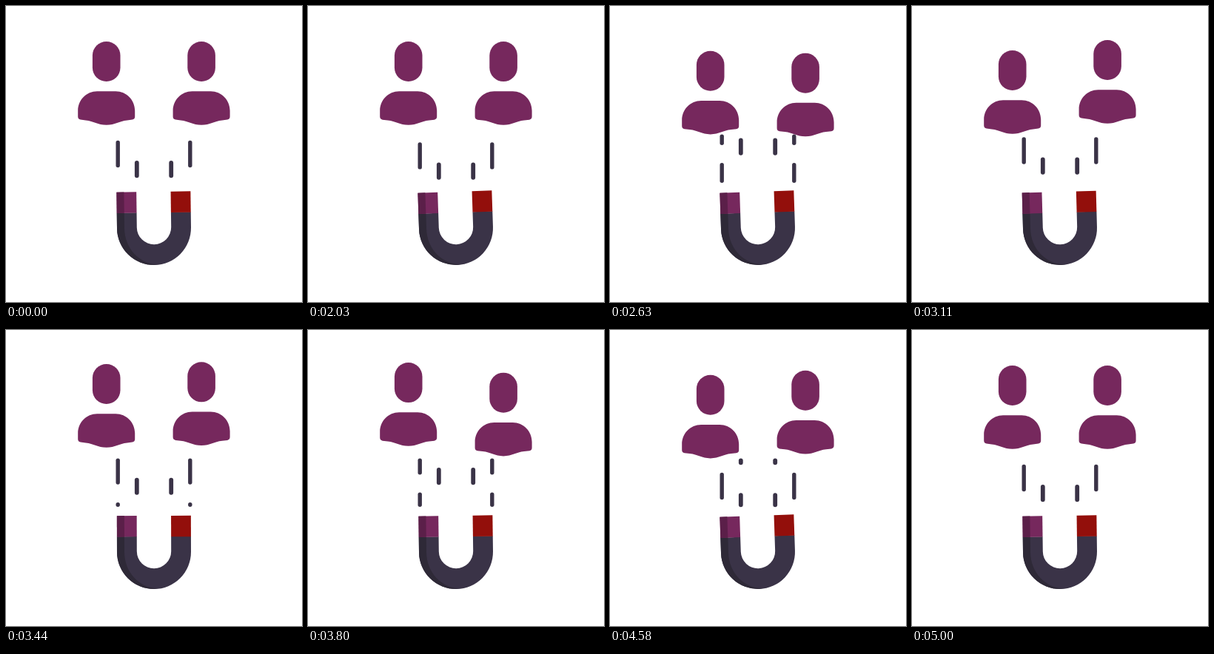
Animation, 400 px wide and 400 px high, one loop 5120 ms. Source, as an HTML page with a canvas:

```html
<!DOCTYPE html>
<html lang="en">
<head>
<meta charset="utf-8">
<title>Magnet</title>
<style>
  html, body { margin: 0; width: 100%; height: 100%; overflow: hidden; background: #fff; }
  canvas { display: block; width: 100vw; height: 100vh; object-fit: contain; }
</style>
</head>
<body>
<canvas width="400" height="400"></canvas>
<script>
const ctx = document.querySelector('canvas').getContext('2d');

const LOOP = 5120, HOLD = 2030, STEP = 30, STEPS = 100;
const PLUM = '#76285d', PLUM_DARK = '#5b1f49';
const SLATE = '#3a3347', SLATE_DARK = '#2e2937', RED = '#930f0b';

// Keys are [step, value] pairs.
const leftBob = [[0, 0], [30, 16], [55, -6], [80, 16], [100, 0]];
const rightBob = [[0, 0], [19, 16], [44, -6], [69, 16], [100, 0]];
const flow = [[0, 0], [1, 0.04], [21, 1.5], [37, 2.925], [48, 3.845], [72, 5.35], [100, 7]];

const bodyShape = new Path2D(
  'M-38.5 141.5 C-38.5 127 -27 115.2 -12.5 115.2 H12.5 C27 115.2 38.5 127 38.5 141.5' +
  'V149.5 Q38.5 153 35 153.6 L28 154.4 C17 155.5 12 160.7 0 160.7' +
  'C-12 160.7 -17 155.5 -28 154.4 L-35 153.6 Q-38.5 153 -38.5 149.5 Z');
const magnetShape = new Path2D(
  'M-50 -21 V0 A50 50 0 0 0 50 0 V-21 H23.2 V-1 A23.2 23.2 0 0 1 -23.2 -1 V-21 Z');
const magnetShade = new Path2D(
  'M-50 -21 V0 A50 50 0 0 0 0 50 L5 49.7 C-21 48 -40 27 -40 0 V-21 Z');

function segment(keys, n) {
  let i = 0;
  while (i < keys.length - 2 && n >= keys[i + 1][0]) i++;
  return i;
}

function swing(keys, n) {
  const i = segment(keys, n);
  const [a, from] = keys[i], [b, to] = keys[i + 1];
  return from + (to - from) * (1 - Math.cos(Math.PI * (n - a) / (b - a))) / 2;
}

// Smooth curve through the keys.
function glide(keys, n) {
  const i = segment(keys, n);
  const slope = k => {
    const p = keys[Math.max(k - 1, 0)], q = keys[Math.min(k + 1, keys.length - 1)];
    return (q[1] - p[1]) / (q[0] - p[0]);
  };
  const [a, from] = keys[i], [b, to] = keys[i + 1];
  const w = b - a, u = (n - a) / w, v = 1 - u;
  return from * (1 + 2 * u) * v * v + to * u * u * (3 - 2 * u) +
    w * u * v * (slope(i) * v - slope(i + 1) * u);
}

function fill(shape, color) {
  ctx.fillStyle = color;
  ctx.fill(shape);
}

function person(x, dy) {
  ctx.save();
  ctx.translate(x, dy);
  const head = new Path2D();
  head.roundRect(-18.8, 48, 37.6, 54, 18.8);
  fill(head, PLUM);
  fill(bodyShape, PLUM);
  ctx.restore();
}

// A downward stream of dashes, cut at both ends of its track.
function stream(x, start, length, period, phase) {
  const top = 176.3, bottom = 236.3;
  const offset = (phase % 1) * period;
  for (let k = -2; k <= 1; k++) {
    const y = start + offset + k * period;
    const y1 = Math.max(y, top), y2 = Math.min(y + length, bottom);
    if (y2 <= y1) continue;
    for (const side of [x, 400 - x]) {
      ctx.beginPath();
      ctx.moveTo(side, y1);
      ctx.lineTo(side, y2);
      ctx.stroke();
    }
  }
}

function magnet(n) {
  const angle = -0.8 - 1.2 * Math.cos(2 * Math.PI * (n - 1.3) / 5);
  ctx.save();
  ctx.translate(200, 300);
  ctx.rotate(angle * Math.PI / 180);
  fill(magnetShape, SLATE);
  fill(magnetShade, SLATE_DARK);
  const block = (x, w, color) => {
    ctx.fillStyle = color;
    ctx.fillRect(x, -49, w, 28.3);
  };
  block(-50, 26.8, PLUM);
  block(-50, 10, PLUM_DARK);
  block(23.2, 26.8, RED);
  ctx.restore();
}

function draw(now) {
  const t = now % LOOP;
  const n = t < HOLD ? 0 : Math.min(STEPS, Math.floor((t - HOLD) / STEP) + 1);
  ctx.fillStyle = '#fff';
  ctx.fillRect(0, 0, 400, 400);

  ctx.strokeStyle = SLATE;
  ctx.lineCap = 'round';
  const phase = glide(flow, n);
  ctx.lineWidth = 5.4;
  stream(151.2, 184.5, 31, 60.5, phase);
  ctx.lineWidth = 5.8;
  stream(176.8, 212, 17.3, 61, phase);

  person(135.7, swing(leftBob, n));
  person(264.1, swing(rightBob, n));
  magnet(n);
}

const begin = performance.now();
function tick() {
  draw(performance.now() - begin);
  requestAnimationFrame(tick);
}
tick();
</script>
</body>
</html>
```
